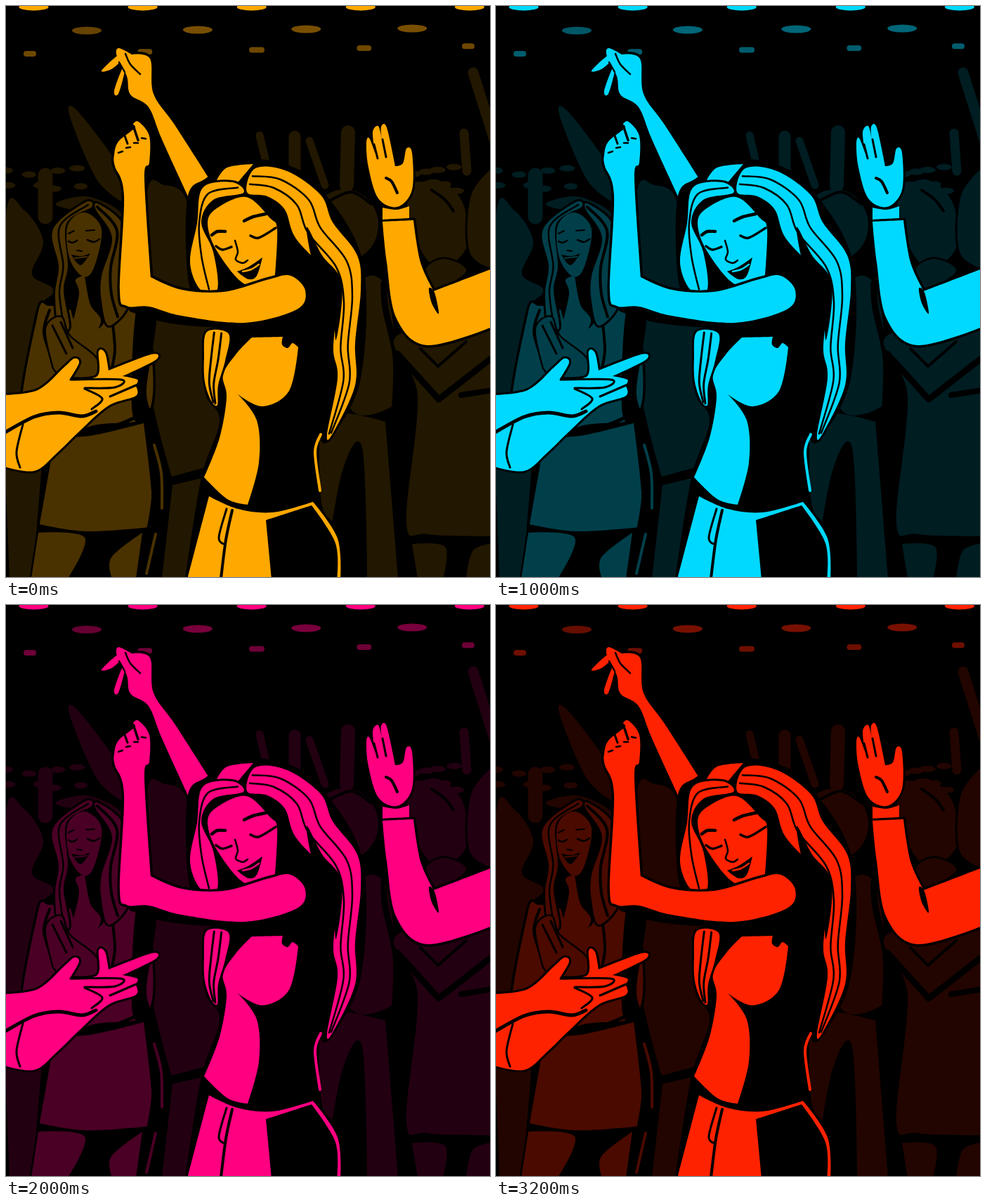
Write an HTML page with a canvas that moves like this. It is 689 px wide and 813 px high and loops after 3400 ms.

```html
<!DOCTYPE html>
<html lang="en">
<head>
<meta charset="utf-8">
<title>Dance floor</title>
<style>
html, body { margin: 0; width: 100%; height: 100%; overflow: hidden; background: #000; }
canvas { display: block; }
</style>
</head>
<body>
<canvas id="stage" width="689" height="813"></canvas>
<script>
const ctx = document.getElementById('stage').getContext('2d');
const STEP = 200, STEPS = 17;
const DIM = 0.135, MID = 0.29, LAMP = 0.47, FULL = 1;
let hue = 0;

// Hue drifts between a few key colours: [step, degrees].
const KEYS = [[0, 39.5], [2, 73], [5, 189], [7, 32], [10, -30], [13, -53], [16, 8]];
function hueAt(step) {
  const k = Math.max(1, KEYS.findIndex(([s]) => s >= step));
  const [s0, h0] = KEYS[k - 1], [s1, h1] = KEYS[k];
  return h0 + (h1 - h0) * (step - s0) / (s1 - s0);
}

function seeded(seed) {
  return () => (seed = seed * 16807 % 2147483647) / 2147483647;
}

const shade = level => `hsl(${hue} 100% ${level * 50}%)`;

// "x,y" points; "!" marks a sharp corner.
const parse = text => text.split(' ').map(s => {
  const [x, y] = s.split(',').map(parseFloat);
  return { x, y, sharp: s.endsWith('!') };
});

const blend = (a, b, t) => a.map((p, i) => ({
  x: p.x + (b[i].x - p.x) * t,
  y: p.y + (b[i].y - p.y) * t
}));

// Smooth curve through the points.
function curve(pts, closed) {
  const n = pts.length;
  const at = i => closed ? pts[(i + n) % n] : pts[Math.max(0, Math.min(n - 1, i))];
  const slope = i => at(i).sharp ? [0, 0]
    : [(at(i + 1).x - at(i - 1).x) / 6, (at(i + 1).y - at(i - 1).y) / 6];
  const path = new Path2D();
  path.moveTo(pts[0].x, pts[0].y);
  for (let i = 0; i < (closed ? n : n - 1); i++) {
    const a = at(i), b = at(i + 1), [ax, ay] = slope(i), [bx, by] = slope(i + 1);
    path.bezierCurveTo(a.x + ax, a.y + ay, b.x - bx, b.y - by, b.x, b.y);
  }
  if (closed) path.closePath();
  return path;
}

function paint(level, path, edge) {
  if (edge) {
    ctx.lineWidth = edge;
    ctx.strokeStyle = '#000';
    ctx.stroke(path);
  }
  ctx.fillStyle = shade(level);
  ctx.fill(path);
}

function trace(width, pts, level = 0) {
  ctx.lineWidth = width;
  ctx.strokeStyle = shade(level);
  ctx.stroke(curve(pts, false));
}

const fill = (level, text, edge = 0) => paint(level, curve(parse(text), true), edge);
const line = (width, text, level) => trace(width, parse(text), level);

// Lock of hair between two guide lines, split by evenly spaced strands.
function lock(level, inner, outer, strands, width = 2.5) {
  const a = parse(inner), b = parse(outer);
  paint(level, curve([...b, ...a.slice().reverse()], true), 6);
  for (let k = 1; k <= strands; k++) trace(width, blend(a, b, k / (strands + 1)));
}

function oval(level, x, y, rx, ry) {
  ctx.fillStyle = shade(level);
  ctx.beginPath();
  ctx.ellipse(x, y, rx, ry, 0, 0, 7);
  ctx.fill();
}

function lamps() {
  for (let i = 0; i < 5; i++) {
    const bulge = Math.sin(Math.PI * i / 4), x = 29 + 156 * i + 9 * bulge, y = 68 - 2.7 * i;
    oval(FULL, 39.5 + 155.1 * i, 1.5, 21, 5);
    if (i < 4) oval(i ? LAMP : 0.4, 115 + 154.4 * i + 4 * Math.sin(Math.PI * i / 3), 35 - i, 21, 5.5);
    line(8, `${x},${y} ${x + 10 + 4 * bulge},${y}`, 0.43);
  }
}

function farHeads() {
  const rand = seeded(11);
  for (const [left, width] of [[0, 115], [578, 65]])
    for (let i = 0; i < 8; i++)
      oval(DIM, left + width * (i % 4 + rand() * 0.6) / 3.6, 228 + 22 * (i >> 2) + rand() * 14, 9 + rand() * 3, 4.5);
}

function crowd() {
  farHeads();
  // Raised arms
  line(21, '56,241 56,300', DIM);
  line(11, '361,184 369,218', DIM);
  line(17, '411,186 411,240', DIM);
  line(11, '432,192 454,255', DIM);
  line(20, '487,180 485,255', DIM);
  line(13, '652,181 656,235', DIM);
  line(15, '665,95 695,190', DIM);
  fill(DIM, '90,154 104,152 164,235 164,278! 128,245', 5);
  // Left side
  fill(DIM, '72,284 110,271 150,284 160,300');
  fill(DIM, '0,298 26,291 53,335 37,382 68,405 42,440 22,560 0,575!');
  fill(DIM, '-2,640! 52,640! 38,815! 5,815!');
  fill(DIM, '200,272 225,255 258,280 262,400 310,450! 310,650! 236,670! 198,500');
  fill(DIM, '237,682! 288,670! 262,815! 222,815!');
  // Right side
  oval(DIM, 482, 312, 48, 51);
  line(4, '449,284 490,265 520,282');
  fill(DIM, '574,268 612,247 650,280 655,345 612,372 578,320');
  line(4, '606,262 625,276 637,292');
  fill(DIM, '662,270 695,228! 695,375! 660,350', 6);
  fill(DIM, '598,374 625,360 655,378 606,406', 5);
  fill(DIM, '500,405 540,398 557,520 549,570 488,568');
  line(9, '538,395 540,430 555,500 554,570');
  fill(DIM, '446,590! 485,580 540,592! 558,815! 445,815!');
  fill(0, '507,629 514,815! 452,815! 478,665');
  fill(DIM, '556,470 695,455! 695,755! 600,752 570,735 586,555');
  fill(DIM, '578,766! 625,770 622,815! 586,815!');
  fill(DIM, '665,775 695,765! 695,815! 655,815!');
  line(4, '590,488 615,513! 655,478');
  line(9, '557,495 616,560! 689,503');
  line(8, '648,554 692,547');
}

function clapper() {
  fill(MID, '100,380! 118,384 125,445 180,430 205,480 202,580 130,596 25,610 45,440 62,427 100,430', 7);
  fill(0, '186,430 214,438 200,545 206,582 180,580');
  line(4, '152,453 155,490 150,520');
  line(4, '62,433 54,465 68,510');
  fill(0, '85,300 140,290 155,340 140,450 98,450 86,360');
  lock(MID, '122,286 86,310 88,370 82,405 90,457', '112,280 67,318 75,370 70,410 75,457', 1);
  lock(MID, '128,290 151,330 136,385 136,420 146,455', '132,282 165,310 162,360 164,400 172,430', 1, 4);
  fill(MID, '112,384! 99,390 104,410 94,455! 108,486 135,450 120,425');
  fill(MID, '112,294 136,318 125,373 109,385 90,358 88,312');
  // Face
  line(2, '89,324 97,320');
  line(2, '114,320 126,319');
  line(2.5, '89,335 95,337 101,334');
  line(2.5, '116,333 125,336 133,332');
  line(2, '101,348 108,349');
  fill(0, '93,354! 108,356 120,352! 106,369');
  line(2, '98,359 115,357', MID);
  // Hands and waist
  fill(MID, '68,515! 57,460 78,443 90,470 130,505 125,545 90,540', 5);
  line(3, '66,455 86,495');
  line(3, '78,450 95,487');
  line(5, '122,602 160,596 200,578');
  // Skirt and legs
  fill(MID, '70,613! 120,612 196,594! 207,690 205,742! 115,748 48,738!', 8);
  fill(0, '198,592! 226,650 218,760 202,815! 184,815! 207,700');
  line(4, '211,625 221,665 222,715', MID);
  fill(MID, '46,750! 112,757 88,815! 36,815!', 5);
  fill(MID, '194,750! 150,785 151,815! 185,815!', 5);
  line(4, '213,752 200,808', MID);
}

function pointers() {
  fill(FULL, '-5,554! 45,547 82,515 97,502 104,508 91,531! 130,527 132,492 141,494 146,519! 207,496 213,504 166,527! 187,532 184,540! 185,555 146,569 105,605 72,637 40,662 -5,655!', 6);
  line(5, '-3,608 40,585 75,579 108,584 128,577');
  line(3, '24,596 15,635 20,657');
  line(3, '92,532 164,532 155,543 112,544');
  line(3, '112,545 137,559 122,574');
  line(3, '148,556 185,540');
}

function raisedHand() {
  fill(FULL, '513,196 517,188 526,211! 522,180 530,171 535,190! 534,172 542,173 554,228! 565,224 570,203 578,209 578,262 557,286 530,274 516,230', 6);
  line(3, '524,197 529,217');
  line(3, '536,190 541,215');
  line(4, '541,245 549,250 557,266');
  fill(FULL, '536,307! 580,305! 590,365 609,406! 695,373! 695,456! 600,483 556,445 542,365', 7);
  fill(FULL, '536,287! 556,290 574,285! 574,302! 536,304!');
  fill(0, '602,402 610,408 616,438 606,423');
}

function backArm() {
  fill(FULL, '160,60 179,69! 205,75 210,125 240,169 290,247! 261,275! 222,190 203,144 177,126 172,100 158,72', 7);
  fill(FULL, '160,70 136,92 150,90 163,78');
  fill(FULL, '166,88 154,121 160,125 169,93');
  line(2.5, '170,68 177,83 191,97');
  line(2.5, '161,80 169,94');
}

function dancerBody() {
  fill(0, '258,276 285,245 335,219 400,226 450,262 508,365 505,530 460,618 446,612! 450,712 478,750 482,817! 255,817! 278,672 304,590 283,545 300,440 262,402');
  fill(FULL, '350,472! 394,471! 393,482 401,487 408,480 416,486! 403,548 365,570 329,552! 357,590 360,650 344,710! 315,702 282,671! 304,615 314,557 309,525 328,495');
  line(4, '448,610 440,635 447,690', FULL);
  fill(FULL, '289,698! 330,716 380,721 437,706! 472,758 476,817! 258,817!');
  fill(0, '370,732! 435,711! 469,765 471,817! 378,817!');
  line(4, '322,718 313,760 306,815');
  line(3, '314,716 303,757 312,767');
}

function dancerHair() {
  fill(FULL, '300,248! 315,230 352,225! 331,250!');
  lock(FULL, '343,265 372,271 397,290 412,330 455,380 469,430 466,490 472,530 457,610',
    '355,231 400,235 448,269 465,308 500,355 505,405 497,480 497,540 466,607', 2);
  fill(0, '428,315 450,355 478,395 470,475 464,430 440,378');
  lock(FULL, '338,266 295,276 278,308 295,350 301,403', '322,251 280,259 272,310 262,365 277,404', 1);
  lock(FULL, '317,467 312,505 302,540 301,568', '286,464 282,500 283,535 292,562', 2, 3);
}

function dancerFace() {
  fill(FULL, '300,288 342,272 376,302 386,318 383,383! 342,397 301,350 287,310', 4);
  line(4.5, '293,326 301,321 312,321');
  line(4.5, '339,306 352,300 370,296');
  line(3.5, '299,342 308,347 321,343');
  line(3.5, '348,327 360,330 384,316');
  line(2.5, '326,334 330,350 327,361 337,366 344,362');
  fill(0, '329,378! 346,371 365,358! 357,384 345,389');
  line(2.5, '337,378 349,375 360,368', FULL);
}

function frontArm() {
  line(12, '180,430 230,445 310,452 370,450');
  fill(FULL, '154,212 160,193 183,174 181,168 189,165 204,185 204,223 197,245 206,386! 250,404 310,407 375,389 405,384 426,405 414,432 340,451 250,441 204,428 172,427 162,405 168,270 155,228', 7);
  line(3, '168,182 173,196');
  line(3.5, '182,173 188,191');
  for (let i = 0; i < 4; i++) line(2.5, `${160 + 11 * i},${209 - 7 * i} ${166 + 11 * i},${207 - 6 * i}`);
}

const scene = [lamps, crowd, clapper, pointers, raisedHand,
  backArm, dancerBody, dancerHair, dancerFace, frontArm];

let shown = -1;
function tick() {
  const step = Math.floor(performance.now() / STEP) % STEPS;
  if (step !== shown) {
    shown = step;
    hue = hueAt(step);
    ctx.fillStyle = '#000';
    ctx.fillRect(0, 0, 689, 813);
    ctx.lineCap = ctx.lineJoin = 'round';
    scene.forEach(draw => draw());
  }
  requestAnimationFrame(tick);
}
tick();
</script>
</body>
</html>
```
